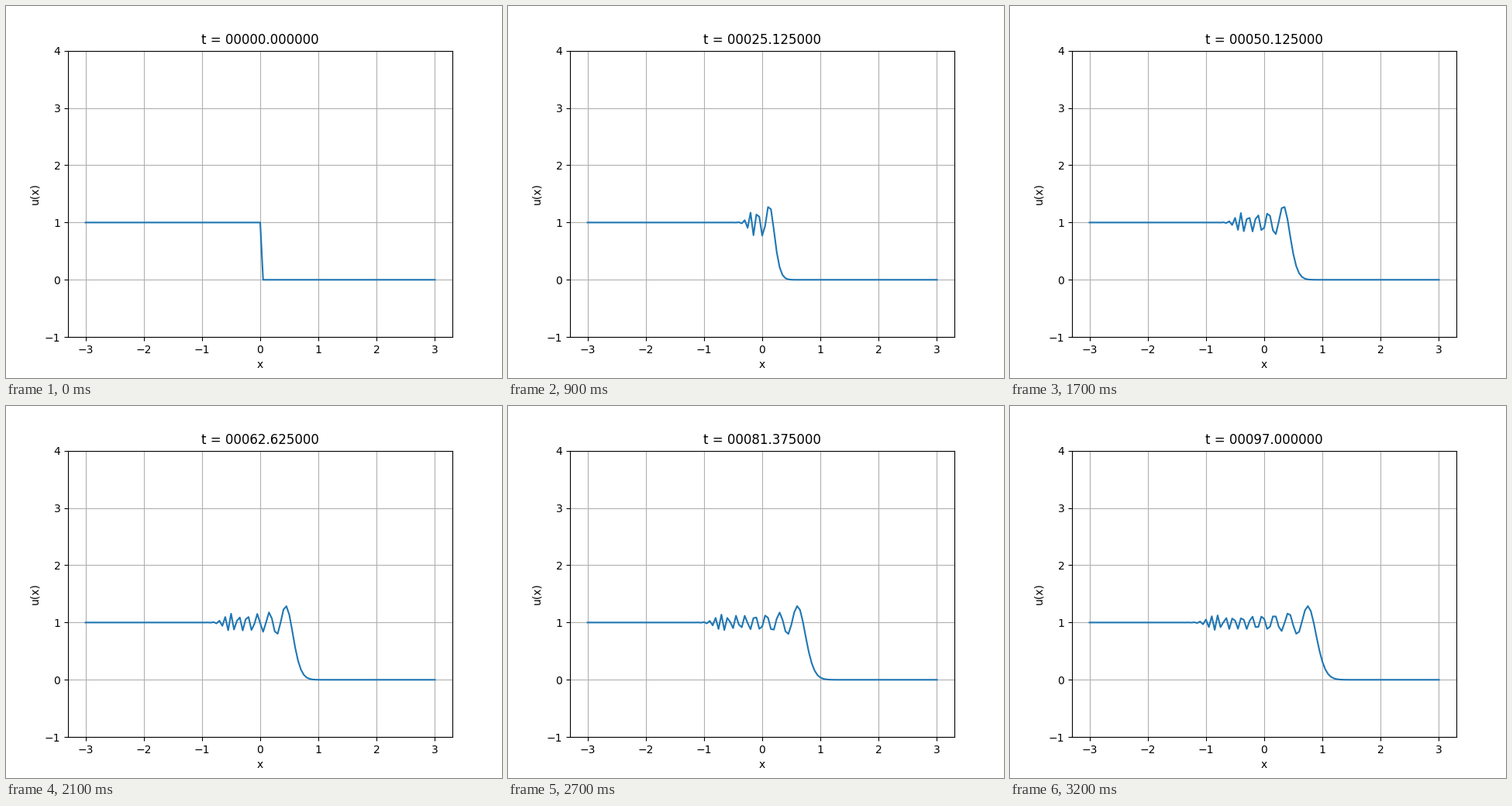
Recreate the animation shown at these times as a matplotlib script. Size 640 by 480 pixels, loop 3300 ms.

```python
import numpy as np
import matplotlib.pyplot as plt
from matplotlib.animation import FuncAnimation

# Linear advection of a step: central differences in x, leapfrog in t
SPEED = 0.01
DX, DT = 0.05, 0.125
FRAMES, STRIDE = 33, 25
STEPS = STRIDE * (FRAMES - 2) + 1

x = np.linspace(-3, 3, 121)


def change(u):
    du = np.zeros_like(u)
    du[1:-1] = -SPEED * DT / (2 * DX) * (u[2:] - u[:-2])
    return du


def solve():
    start = np.where(np.arange(x.size) <= x.size // 2, 1.0, 0.0)
    half = start + change(start) / 2
    states = [start, start + change(half)]
    while len(states) <= STEPS:
        states.append(states[-2] + 2 * change(states[-1]))
    return states


states = solve()

fig, ax = plt.subplots(figsize=(6.4, 4.8), dpi=100)
line, = ax.plot(x, states[0])
ax.set_xlim(-3.3, 3.3)
ax.set_ylim(-1, 4)
ax.set_xlabel("x")
ax.set_ylabel("u(x)")
ax.grid(True)
title = ax.set_title("")


def update(i):
    step = STRIDE * (i - 1) + 1 if i else 0
    line.set_ydata(states[step])
    title.set_text(f"t = {step * DT:012.6f}")
    return line, title


anim = FuncAnimation(fig, update, frames=FRAMES, interval=100, repeat=True)
plt.show()
```
